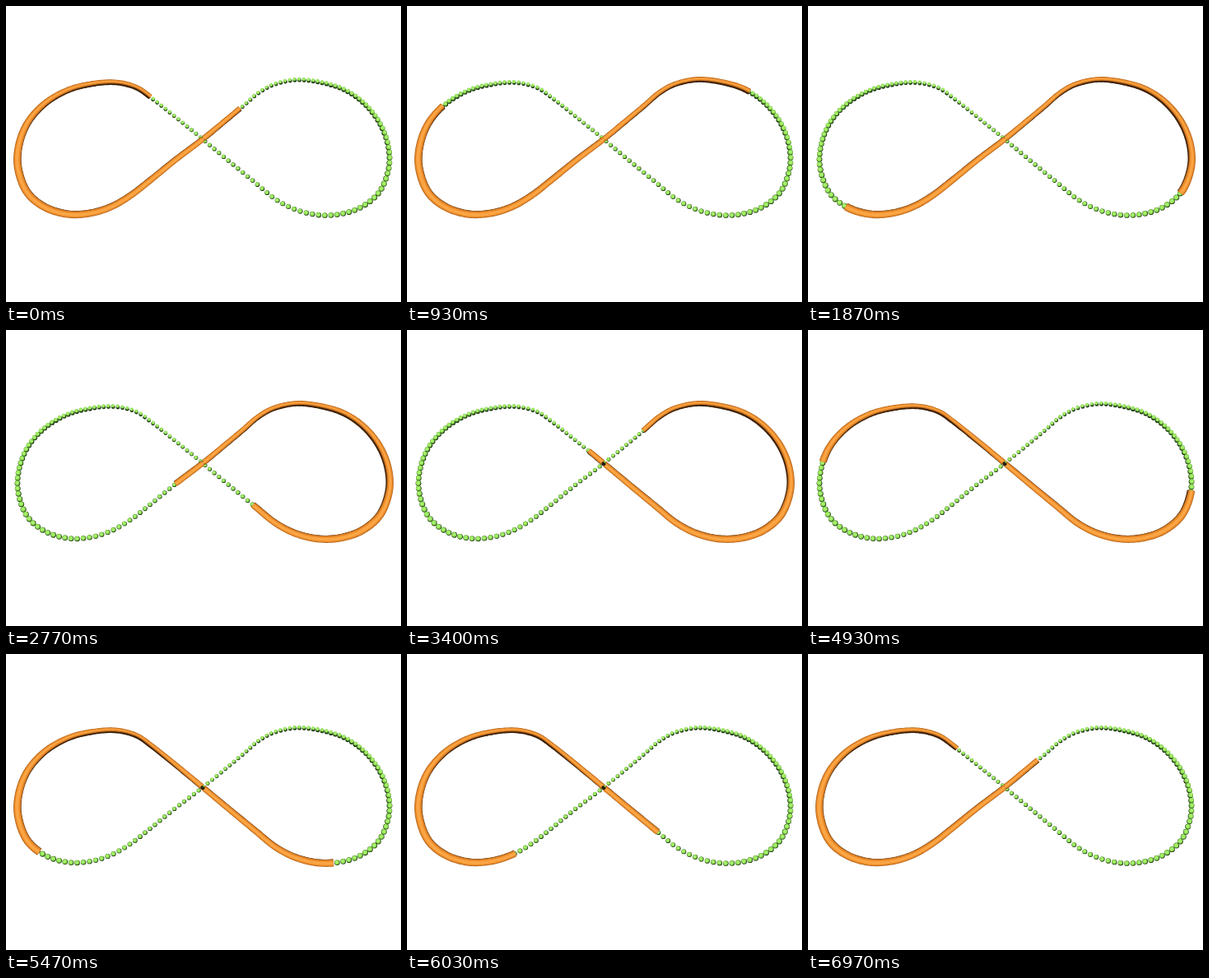
Write an HTML page with a canvas that moves like this. It is 480 px wide and 360 px high and loops after 7.01 s.

```html
<!DOCTYPE html>
<html lang="en">
<head>
<meta charset="utf-8">
<title>Figure eight</title>
<style>
  html, body { margin: 0; width: 100%; height: 100%; overflow: hidden; background: #fff; }
  canvas { display: block; width: 480px; height: 360px; }
</style>
</head>
<body>
<canvas id="stage" width="480" height="360"></canvas>
<script>
const ctx = document.getElementById('stage').getContext('2d');
const LOOP = 7010, STEP = 100 / 3, LAST = 209;

// Closed track: right lobe clockwise, then left lobe counterclockwise.
const knots = [
  [239, 162], [267, 139], [288, 121.5], [306, 106], [326, 95], [353, 89.5], [382, 92.5],
  [410, 101], [434, 117], [453, 140], [464, 167], [465.5, 195], [455, 224], [434, 243],
  [408, 252.5], [380, 254], [352, 247.5], [327, 234.5], [303, 215], [272, 189.5],
  [239, 162], [205, 134], [176, 111], [158, 99], [134, 93], [106, 94.5], [76, 102],
  [48, 118], [27, 141], [16, 168], [14.5, 196], [25, 225.5], [46, 244], [74, 253],
  [102, 252], [128, 244], [152, 230], [177, 210.5], [206, 187]
];

// Step, head x, head y, tail x, tail y
const poses = [
  [0, 285, 124.5, 176, 110.5],
  [56, 454, 228, 45, 245],
  [83, 300, 213, 206, 187],
  [121, 135, 93, 382, 92.5],
  [148, 18, 160, 465, 195],
  [181, 132, 243, 305, 217],
  [209, 279, 128, 181, 115]
];

const spline = (a, b, c, d, t) =>
  b + 0.5 * t * (c - a + t * (2 * a - 5 * b + 4 * c - d + t * (3 * (b - c) + d - a)));
const mix = (a, b, t) => a + (b - a) * t;

function resample() {
  const n = knots.length, fine = [];
  for (let i = 0; i <= n * 24; i++) {
    const k = Math.floor(i / 24), t = (i % 24) / 24;
    const [a, b, c, d] = [-1, 0, 1, 2].map(o => knots[(k + o + n) % n]);
    fine.push([0, 1].map(j => spline(a[j], b[j], c[j], d[j], t)));
  }
  const even = [fine[0]];
  let left = 1;
  for (let i = 1; i < fine.length; i++) {
    const p = fine[i - 1], q = fine[i];
    const len = Math.hypot(q[0] - p[0], q[1] - p[1]);
    let pos = left;
    for (; pos <= len; pos++) even.push([mix(p[0], q[0], pos / len), mix(p[1], q[1], pos / len)]);
    left = pos - len;
  }
  return even;
}

const track = resample();
const L = track.length;

function pointAt(s) {
  s = ((s % L) + L) % L;
  const i = Math.floor(s), p = track[i], q = track[(i + 1) % L];
  return [mix(p[0], q[0], s - i), mix(p[1], q[1], s - i)];
}

// Position, left normal, tube radius and depth of the inner shadow
function sample(s) {
  const [x, y] = pointAt(s), a = pointAt(s - 2), b = pointAt(s + 2);
  const len = Math.hypot(b[0] - a[0], b[1] - a[1]);
  const nx = (a[1] - b[1]) / len, ny = (b[0] - a[0]) / len;
  const side = x > 239 ? 1 : -1;
  const shade = Math.max(0, side * (0.6 * ny - 0.35 * nx) + 0.2)
    * Math.min(1, Math.abs(x - 239) / 70);
  const r = 3.1 + 0.9 * (y - 92) / 160 + 1.1 * ((x - 240) / 226) ** 2;
  return { x, y, nx, ny, r, side, shade };
}

function nearest(x, y) {
  let best = 0, min = Infinity;
  track.forEach((p, i) => {
    const d = Math.hypot(p[0] - x, p[1] - y);
    if (d < min) { min = d; best = i; }
  });
  return best;
}

function unroll(col) {
  const keys = [];
  poses.forEach((p, i) => {
    let s = nearest(p[col], p[col + 1]);
    while (i && s < keys[i - 1][1]) s += L;
    keys.push([p[0], s]);
  });
  keys.push([LAST + 1, keys[0][1] + L]);
  return keys;
}

const headKeys = unroll(1), tailKeys = unroll(3);

function along(keys, step) {
  const i = keys.findIndex(k => k[0] > step);
  const [f0, s0] = keys[i - 1], [f1, s1] = keys[i];
  return mix(s0, s1, (step - f0) / (f1 - f0));
}

function disc(x, y, r, color) {
  ctx.fillStyle = color;
  ctx.beginPath();
  ctx.arc(x, y, r, 0, 7);
  ctx.fill();
}

function bead(s) {
  const p = sample(s), r = p.r * 0.72, k = p.side * p.shade * 1.4;
  const dx = p.nx * k + 0.4, dy = p.ny * k + 0.5;
  disc(p.x + dx / 2, p.y + dy / 2, r, '#1f3d12');
  disc(p.x - dx / 3, p.y - dy / 3, r * 0.87, '#86d24c');
  disc(p.x - dx / 2, p.y - dy / 2, r * 0.6, '#a5f06c');
}

// Strip along the track; edges gives its two offsets from the centre line.
function ribbon(body, color, edges) {
  const near = [], far = [];
  body.forEach(p => {
    const [a, b] = edges(p);
    near.push([p.x + p.nx * a, p.y + p.ny * a]);
    far.unshift([p.x + p.nx * b, p.y + p.ny * b]);
  });
  ctx.fillStyle = color;
  ctx.beginPath();
  near.concat(far).forEach(q => ctx.lineTo(q[0], q[1]));
  ctx.fill();
}

function tube(from, to) {
  const body = [];
  for (let s = from; s < to; s += 2) body.push(sample(s));
  body.push(sample(to));
  const inset = (outer, inner, depth) => p =>
    [p.side * (inner * p.r - depth * p.shade), -p.side * outer * p.r];
  ribbon(body, '#3d2006', inset(0.8, 1, 0));
  ribbon(body, '#b4651c', inset(1, 0.97, 2.2));
  ribbon(body, '#e98a2a', inset(0.82, 0.76, 2.4));
  ribbon(body, '#fba544', inset(0.5, 0.35, 2));
}

const BEADS = 180;
function drawBeads() {
  for (let i = 0; i < BEADS; i++) {
    const u = i * L / BEADS;
    bead(u + 16 * Math.cos(4 * Math.PI * (u - 40) / L));
  }
}

function draw(now) {
  const step = Math.min(LAST, Math.floor((now % LOOP + 5) / STEP));
  const head = along(headKeys, step);
  let tail = along(tailKeys, step);
  while (tail > head) tail -= L;
  while (head - tail > L) tail += L;

  ctx.fillStyle = '#fff';
  ctx.fillRect(0, 0, 480, 360);
  drawBeads();
  tube(tail, head);

  // The other strand peeks through where the falling diagonal is covered.
  const cross = nearest(240, 163) > L / 4 ? L / 2 : 598;
  const covered = [cross, cross + L].some(s => s > tail && s < head);
  if (covered) {
    disc(239, 162.5, 2.6, '#22200c');
    disc(240.5, 160.5, 1.2, '#86d24c');
  }
}

let start;
function tick(now) {
  if (start === undefined) start = now;
  draw(now - start);
  requestAnimationFrame(tick);
}
draw(0);
requestAnimationFrame(tick);
</script>
</body>
</html>
```
